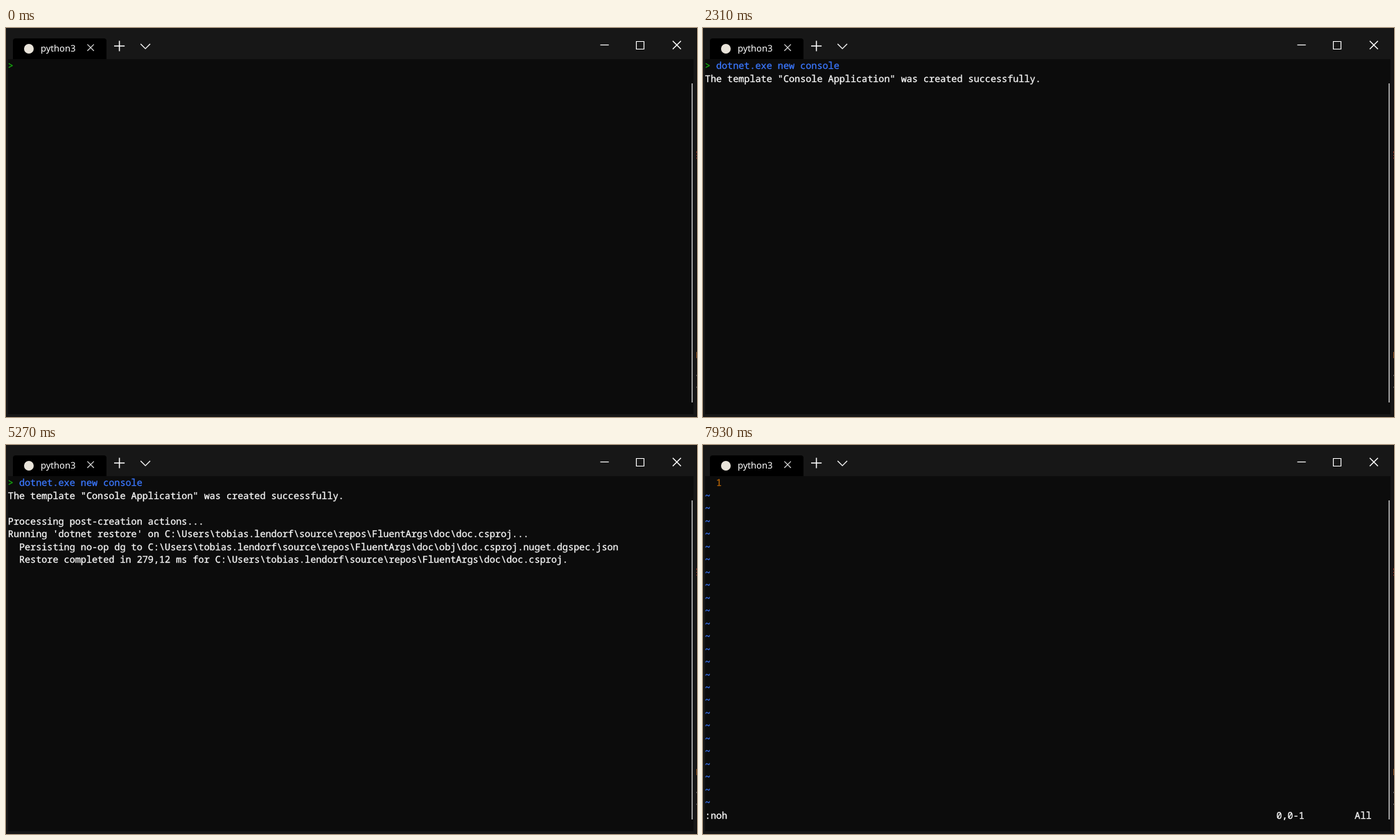
An HTML page for the animation above (7990 ms loop, 997 by 562 pixels).

```html
<!DOCTYPE html>
<html lang="en">
<head>
<meta charset="utf-8">
<title>Terminal</title>
<style>
  html, body { margin: 0; width: 100%; height: 100%; overflow: hidden; background: #171717; }
  svg { display: block; width: 100vw; height: 100vh; }
  text { white-space: pre; text-rendering: geometricPrecision; }
  #screen text {
    font: 13.47px "Noto Sans Mono", "DejaVu Sans Mono", monospace;
    font-variant-ligatures: none;
    fill: currentColor;
    stroke: currentColor;
    stroke-width: .3;
  }
  .tab { font: 13px "Noto Sans", "Open Sans", sans-serif; fill: #fff; }
  .icon { fill: none; stroke: #fff; stroke-width: 1.2; }
</style>
</head>
<body>
<svg viewBox="0 0 997 562">
  <rect width="997" height="562" fill="#171717"/>
  <rect x="3" y="45" width="989" height="513" fill="#0c0c0c"/>
  <path d="M10 45V19q0-4 4-4H141q4 0 4 4V45z" fill="#000"/>
  <circle cx="33" cy="30" r="7" fill="#e9e4da"/>
  <text class="tab" x="50" y="33.7">python3</text>
  <g class="icon">
    <path d="M117.4 23.6l9.4 9.4m0-9.4l-9.4 9.4" stroke="#d8d8d8"/>
    <path d="M156 26h15.2M163.6 18.4v15.2" stroke-width="1.5"/>
    <path d="M194.2 23l6.9 6.9 6.9-6.9" stroke-width="1.3"/>
    <path d="M857.5 24.5h12.2"/>
    <path d="M909.5 19.5h11v11h-11z"/>
    <path d="M962 18.8l11.8 11.8m0-11.8l-11.8 11.8" stroke-width="1.4"/>
  </g>
  <rect x="989" y="80" width="2" height="461" fill="#9a9a9a"/>
  <rect x="996" width="1" height="562" fill="#0c0c0c"/>
  <path d="M996.5 178v3m0 2v2m0 2v2" stroke="#7a2a1a"/>
  <path d="M996.5 468v9" stroke="#8a4c1a"/>
  <path d="M996.5 501v2m0 15v2" stroke="#555"/>
  <g id="screen"></g>
</svg>
<script>
const LOOP = 7990, COL = 8.082, ROW = 18.48;
const GREEN = '#16b00e', BLUE = '#3b78ff', WHITE = '#fafafa', ORANGE = '#b56408';
const CLEAR = 7840, VIM = 7930;
const screen = document.getElementById('screen');
const items = [];

// Text at a grid cell, visible from start until end
function put(row, col, str, start, end = CLEAR, color = WHITE) {
  const el = document.createElementNS('http://www.w3.org/2000/svg', 'text');
  el.setAttribute('x', 2.8 + col * COL);
  el.setAttribute('y', 59.3 + row * ROW);
  el.style.color = color;
  el.textContent = str;
  screen.append(el);
  items.push({ el, start, end });
  return el;
}

const repo = 'C:\\Users\\tobias.lendorf\\source\\repos\\FluentArgs\\doc\\';
const command = 'dotnet.exe new console';

put(0, 0, '>', 0, CLEAR, GREEN);
const typed = put(0, 2, '', 140, CLEAR, BLUE);
put(1, 0, 'The template "Console Application" was created successfully.', 2310);
put(3, 0, 'Processing post-creation actions...', 2400);
put(4, 0, `Running 'dotnet restore' on ${repo}doc.csproj...`, 2400);
put(5, 2, `Persisting no-op dg to ${repo}obj\\doc.csproj.nuget.dgspec.json`, 4960);
put(6, 2, `Restore completed in 279,12 ms for ${repo}doc.csproj.`, 5270);
put(8, 0, 'Restore succeeded.', 5420);
put(10, 0, '>', 5730, CLEAR, GREEN);
put(10, 2, 'vim Program.cs', 5730, CLEAR, BLUE);

put(0, 2, '1', VIM, LOOP, ORANGE);
for (let row = 1; row <= 25; row++) put(row, 0, '~', VIM, LOOP, BLUE);
put(26, 0, ':noh', VIM, LOOP);
put(26, 102, '0,0-1', VIM, LOOP);
put(26, 116, 'All', VIM, LOOP);

function typedLength(t) {
  if (t >= 1080) return 22;
  if (t >= 1010) return 21;
  if (t < 140) return 0;
  const step = Math.min(11, 1 + Math.floor((t - 140) / 79));
  return Math.round(step * 20 / 11);
}

function render(t) {
  for (const { el, start, end } of items) {
    el.style.display = t >= start && t < end ? '' : 'none';
  }
  typed.textContent = command.slice(0, typedLength(t));
}

const began = performance.now();
function tick() {
  render((performance.now() - began) % LOOP);
  requestAnimationFrame(tick);
}
tick();
</script>
</body>
</html>
```
